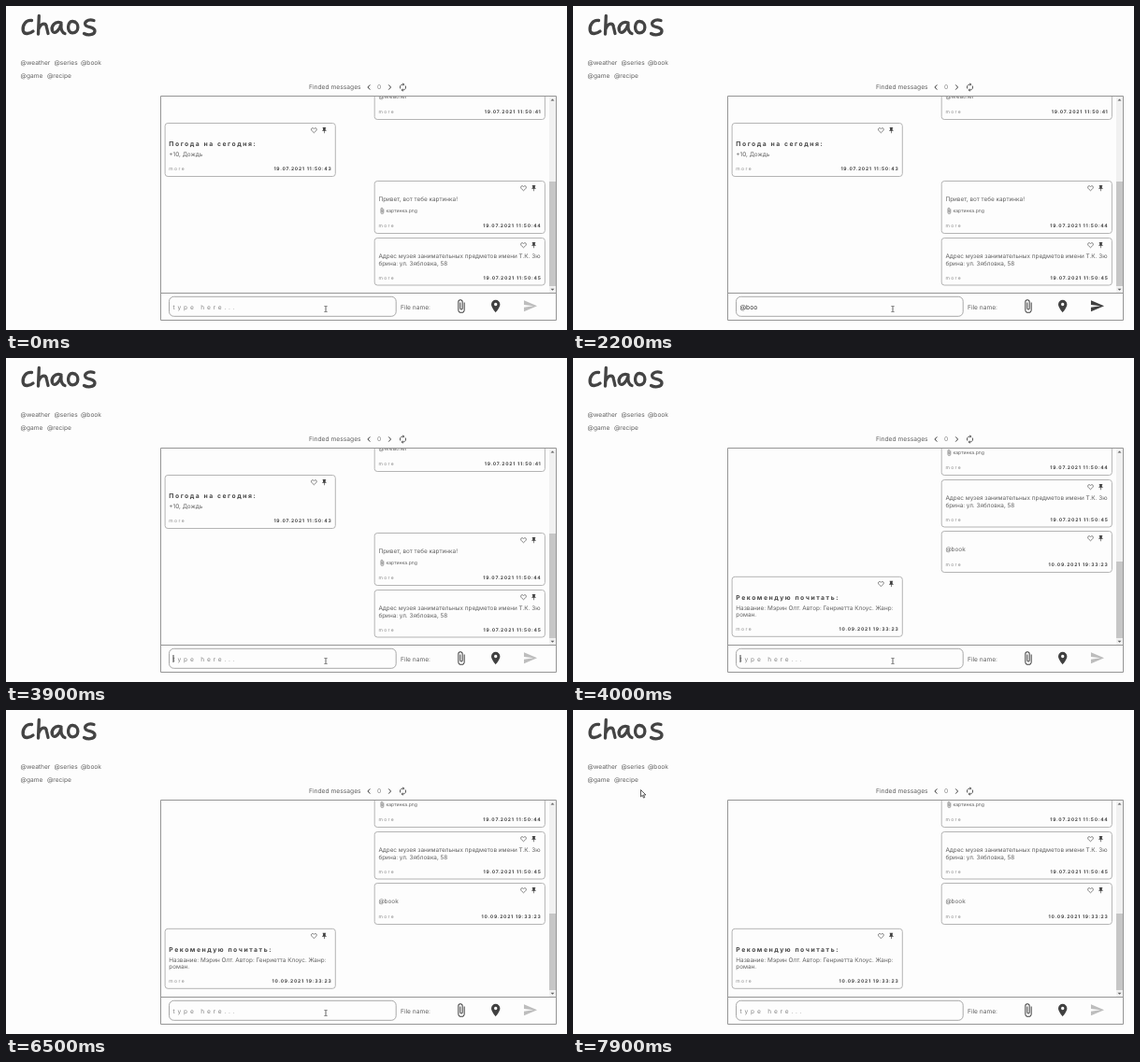
An HTML page with a canvas for the animation above (8000 ms loop, 600x347 px).

```html
<!DOCTYPE html>
<html lang="ru">
<head>
<meta charset="utf-8">
<title>chaos</title>
<style>
  html, body { margin: 0; width: 100%; height: 100%; overflow: hidden; background: #fdfdfd; }
  canvas { display: block; width: 600px; height: 347px; }
</style>
</head>
<body>
<canvas id="stage"></canvas>
<script>
const W = 600, H = 347, LOOP = 8000, STEP = 100;
const canvas = document.getElementById('stage');
const ctx = canvas.getContext('2d');
const ratio = window.devicePixelRatio || 1;
canvas.width = W * ratio;
canvas.height = H * ratio;

const BG = '#fdfdfd', INK = '#444', TEXT = '#606060', SOFT = '#858585', DARK = '#404040';
const FRAME = '#959595', EDGE = '#b4b4b4';
const FONT = 'Inter, "Open Sans", sans-serif';
const BODY = 6.4, UI = 6.6;

// Icons live on a 24-unit grid: stroked part, filled part, line width.
const icon = (stroke, fill, width = 2) => ({ stroke: new Path2D(stroke), fill: new Path2D(fill), width });
const HEART = icon('M12 20C6 15 3 12 3 8.5 3 4 9 2.5 12 6.5c3-4 9-2.5 9 2 0 3.5-3 6.5-9 11.5z', '');
const PIN = icon('', 'M16 9V4h1a1 1 0 0 0 0-2H7a1 1 0 0 0 0 2h1v5a3 3 0 0 1-3 3v2h6v7l1 1 1-1v-7h6v-2a3 3 0 0 1-3-3z');
const CLIP = icon('M17.25 6v11.5a4.75 4.75 0 0 1-9.5 0V5a3.25 3.25 0 0 1 6.5 0v10.5a1.75 1.75 0 0 1-3.5 0V6', '', 1.5);
const PLACE = icon('', 'M12 2a7 7 0 0 0-7 7c0 5.25 7 13 7 13s7-7.75 7-13a7 7 0 0 0-7-7zM12 11.5a2.5 2.5 0 1 1 0-5 2.5 2.5 0 0 1 0 5z');
const SEND = icon('', 'M2 21L23 12 2 3v7l15 2-15 2z');
const RENEW = icon('M5.97 15.5A7 7 0 0 1 12 5M18.03 8.5A7 7 0 0 1 12 19', 'M12 1l4 4-4 4zM12 15v8l-4-4z');
const TITLE = new Path2D(
  'M27.5 15.5C21 14.5 17.5 21 18.2 26C19 31.5 26 29.5 29 27' +
  'M35.3 10.5L34.5 30M34.8 25C38 17 43 18 43.5 23L45 29.5' +
  'M59 18C52 15.5 48 22 49.5 26.5C51.5 31.5 57.5 26 59 19C58.5 25 59.5 28.5 63 29.5' +
  'M71.5 16.5C65.5 15.5 64.5 28.5 71 28.8C78.5 29 79 17 71.5 16.5' +
  'M94 15.5C87 13.5 82.5 18 85.5 21C88.5 23.2 95.5 22.5 95 27C94.5 31.5 87 31.5 83.5 29.5');
const ARROW = new Path2D('M0 0V7.4L1.8 5.8 3 8.6 4.2 8.1 3 5.4H5.4z');

const cards = [
  { x: 394.2, y: 77.5, h: 44, lines: ['@weather'], date: '19.07.2021 11:50:41' },
  { x: 170.1, y: 125.5, h: 57, title: 'Погода на сегодня:', lines: ['+10, Дождь'], date: '19.07.2021 11:50:43' },
  { x: 394.2, y: 187.5, h: 56, lines: ['Привет, вот тебе картинка!'], file: 'картинка.png', date: '19.07.2021 11:50:44' },
  { x: 394.2, y: 248.5, h: 50.5, date: '19.07.2021 11:50:45',
    lines: ['Адрес музея занимательных предметов имени Т.К. Зю', 'брина: ул. Зябловка, 58'] },
  { x: 394.2, y: 303.5, h: 44, reply: true, lines: ['@book'], date: '10.09.2021 19:33:23' },
  { x: 170.1, y: 352.3, h: 64, reply: true, title: 'Рекомендую почитать:', date: '10.09.2021 19:33:23',
    lines: ['Название: Мэрин Олт. Автор: Генриетта Клоус. Жанр:', 'роман.'] }
];
const REPLY_AT = 4000, SCROLL = 118;

const typed = [[600, '@'], [1700, '@b'], [2000, '@bo'], [2200, '@boo'], [2500, '@book'], [3900, '']];
const BLINK = [600, 1100, 1700, 2200, 2700, 3300, 3800, 4300, 4900, 5400, 5900, 6500, 7000, 7500];

// time, x, y, text cursor
const pointer = [
  [0, 342, 324.5, true], [7100, 292, 299, false], [7200, 236, 269.5, true],
  [7300, 400, 232, false], [7400, 536, 206, false], [7500, 440, 178, false],
  [7600, 305, 152, false], [7700, 178, 124, false], [7800, 81.5, 96, false], [7900, 72.5, 85.5, false]
];

const latest = (list, t) => list.filter(item => item[0] <= t).pop();

function text(str, x, y, { size = UI, color = TEXT, weight = 400, gap = 0, align = 'left' } = {}) {
  ctx.font = `${weight} ${size}px ${FONT}`;
  ctx.letterSpacing = gap + 'px';
  ctx.textRendering = 'geometricPrecision';
  ctx.textAlign = align;
  ctx.fillStyle = color;
  ctx.fillText(str, x, y);
}

function drawIcon(shape, x, y, scale, color = DARK, mid = 12) {
  ctx.save();
  ctx.translate(x, y);
  ctx.scale(scale, scale);
  ctx.translate(-mid, -12);
  ctx.lineWidth = shape.width;
  ctx.strokeStyle = ctx.fillStyle = color;
  ctx.stroke(shape.stroke);
  ctx.fill(shape.fill);
  ctx.restore();
}

function line(points, color, width = 1) {
  ctx.beginPath();
  points.forEach(p => ctx.lineTo(...p));
  ctx.strokeStyle = color;
  ctx.lineWidth = width;
  ctx.stroke();
}

function box(x, y, w, h, r, color) {
  ctx.beginPath();
  ctx.roundRect(x, y, w, h, r);
  ctx.strokeStyle = color;
  ctx.lineWidth = 1;
  ctx.stroke();
}

function triangle(x, y, dir) {
  ctx.beginPath();
  ctx.moveTo(x - 2, y + dir);
  ctx.lineTo(x + 2, y + dir);
  ctx.lineTo(x, y - dir);
  ctx.fillStyle = '#606060';
  ctx.fill();
}

function drawCard(card) {
  const { x, y, h } = card, left = x + 4.2;
  box(x, y, 182.2, h, 3, EDGE);
  drawIcon(HEART, x + 159.3, y + 7.7, 0.32);
  drawIcon(PIN, x + 170.3, y + 7.7, 0.32);
  let base = y + 21.8;
  if (card.title) {
    text(card.title, left, y + 24.8, { size: 6.8, weight: 700, gap: 1.55, color: INK });
    base = y + 35.3;
  }
  card.lines.forEach((str, i) => text(str, left, base + i * 7.4, { size: BODY }));
  if (card.file) {
    drawIcon(CLIP, left + 4, y + 31.9, 0.31, DARK, 12.5);
    text(card.file, left + 8, y + 33.9, { size: 5.1 });
  }
  const foot = y + h - 6.1;
  text('more', left, foot, { size: 5, color: SOFT, gap: 1.4 });
  text(card.date, x + 178.3, foot, { size: 5, weight: 700, gap: 0.75, align: 'right', color: DARK });
}

function drawHeader() {
  ctx.lineCap = ctx.lineJoin = 'round';
  ctx.strokeStyle = INK;
  ctx.lineWidth = 3.3;
  ctx.stroke(TITLE);
  ctx.lineCap = 'butt';
  ctx.lineJoin = 'miter';
  [['@weather', 15.6, 63], ['@series', 51.5, 63], ['@book', 80, 63], ['@game', 15.6, 77.3], ['@recipe', 44, 77.3]]
    .forEach(([tag, x, y]) => text(tag, x, y));
  text('Finded messages', 324, 89.2, { size: 6.7 });
  line([[389.3, 84.4], [386.9, 87], [389.3, 89.6]], DARK, 1);
  text('0', 399.2, 89.2, { align: 'center', color: SOFT });
  line([[409.2, 84.4], [411.6, 87], [409.2, 89.6]], DARK, 1);
  drawIcon(RENEW, 424.5, 87, 0.44);
}

function drawList(t) {
  const replied = t >= REPLY_AT;
  ctx.save();
  ctx.beginPath();
  ctx.rect(166, 97, 415, 210);
  ctx.clip();
  if (replied) ctx.translate(0, -SCROLL);
  cards.filter(c => replied || !c.reply).forEach(drawCard);
  ctx.restore();

  ctx.fillStyle = '#f1f1f1';
  ctx.fillRect(581, 97, 7, 210);
  ctx.fillStyle = '#c6c6c6';
  const top = replied ? 218 : 188;
  ctx.fillRect(581, top, 7, 300 - top);
  triangle(584.5, 100.5, 1);
  triangle(584.5, 303.7, -1);
  box(165.5, 96.5, 423, 240, 0, FRAME);
  line([[165.5, 307.5], [588.5, 307.5]], FRAME);
}

function drawInput(t) {
  const entry = latest(typed, t);
  const value = entry ? entry[1] : '';
  box(174.5, 311.3, 242.7, 21, 5, '#a8a8a8');
  let caretX = 178.5;
  if (value) {
    text(value, 178.5, 324.5, { size: 6.8, color: '#333' });
    caretX += ctx.measureText(value).width;
  } else {
    text('type here...', 178.5, 324.5, { color: SOFT, gap: 2.8 });
  }
  if (BLINK.filter(at => at <= t).length % 2) {
    ctx.fillStyle = '#444';
    ctx.fillRect(caretX, 318, 1, 8);
  }
  text('File name:', 422, 324.5);
  drawIcon(CLIP, 487, 321.5, 0.67, DARK, 12.5);
  drawIcon(PLACE, 523.7, 321.5, 0.67);
  drawIcon(SEND, 561, 321.3, 0.67, value ? DARK : '#bdbdbd', 12.5);
}

function drawPointer(t) {
  const [, x, y, beam] = latest(pointer, t);
  if (beam) {
    line([[x, y - 3], [x, y + 3]], DARK, 0.8);
    [-3, 3].forEach(d => line([[x - 1.7, y + d], [x + 1.7, y + d]], '#666', 0.7));
    return;
  }
  ctx.save();
  ctx.translate(x, y);
  ctx.fillStyle = '#fff';
  ctx.fill(ARROW);
  ctx.strokeStyle = '#333';
  ctx.lineWidth = 0.8;
  ctx.stroke(ARROW);
  ctx.restore();
}

function frame(now) {
  const t = Math.floor((now % LOOP) / STEP) * STEP;
  ctx.setTransform(ratio, 0, 0, ratio, 0, 0);
  ctx.fillStyle = BG;
  ctx.fillRect(0, 0, W, H);
  drawHeader();
  drawList(t);
  drawInput(t);
  drawPointer(t);
}

const start = performance.now();
function tick() {
  frame(performance.now() - start);
  requestAnimationFrame(tick);
}
tick();
</script>
</body>
</html>
```
